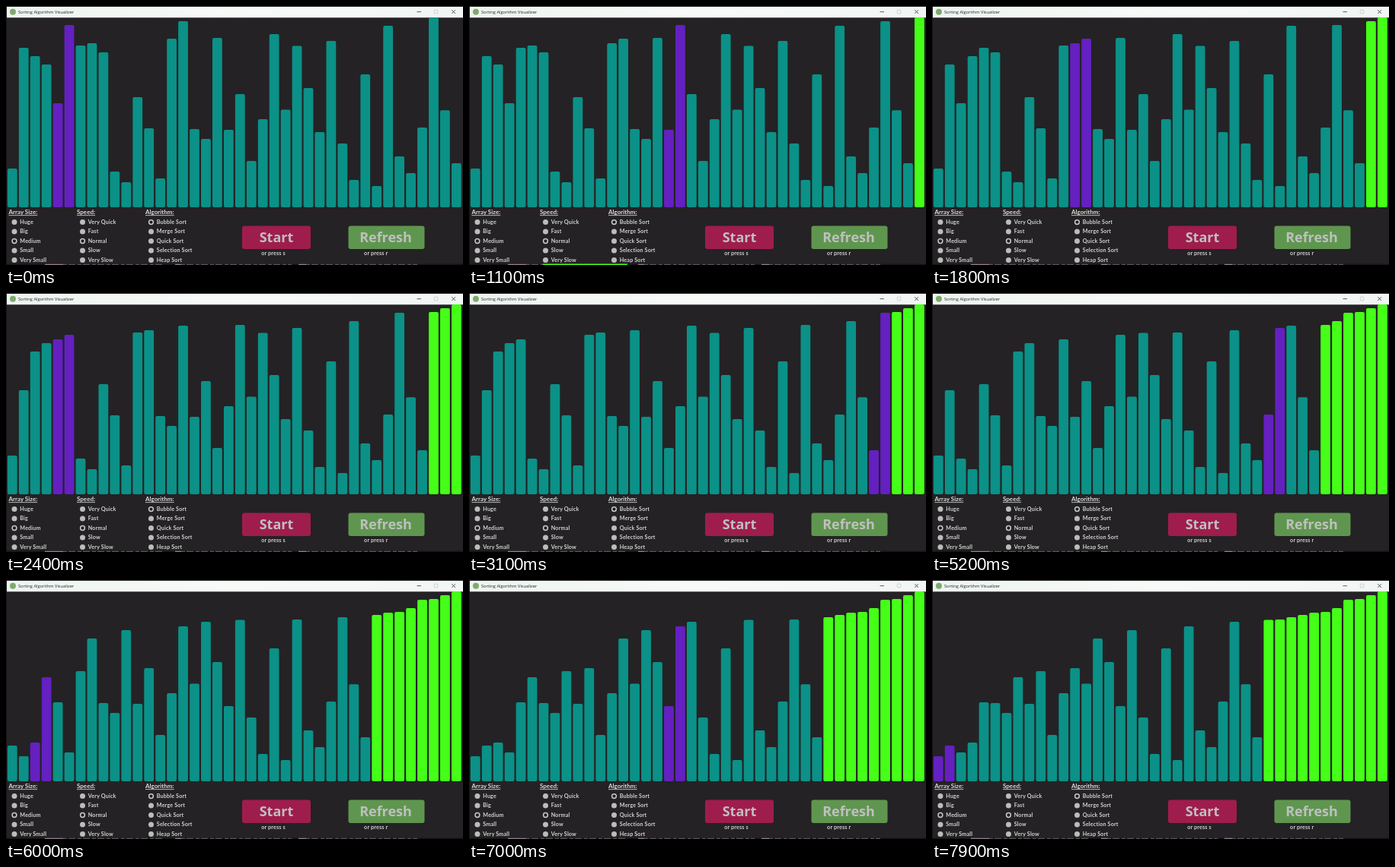
Write an HTML page that moves like this. It is 600 by 341 pixels and loops after 8 s.

```html
<!DOCTYPE html>
<html lang="en">
<head>
<meta charset="utf-8">
<title>Sorting Algorithm Visualizer</title>
<style>
  html, body { margin: 0; width: 100%; height: 100%; overflow: hidden; background: #242224; }
  svg { display: block; width: 600px; height: 341px; }
  .title { font: 5.7px "Open Sans", sans-serif; fill: #222; }
  .head { font: 700 8px Lato, sans-serif; fill: #dedede; text-decoration: underline; }
  .label { font: 700 7.2px Lato, sans-serif; letter-spacing: .15px; fill: #d2d2d2; }
  .mid { text-anchor: middle; }
  .button { font: 900 18px "Noto Sans", "Open Sans", sans-serif; font-stretch: 62.5%; fill: #bfbfbf; text-anchor: middle; }
  .dot { fill: #bcbcbc; }
  .ring { fill: #242224; stroke: #c8c8c8; stroke-width: 1.5; }
  .flash { opacity: 0; animation: flash 8s step-end infinite; }
  @keyframes flash { 13.75% { opacity: 1; } 15% { opacity: 0; } }
</style>
</head>
<body>
<svg viewBox="0 0 600 341">
  <defs>
    <linearGradient id="bar">
      <stop offset="0" stop-color="#edf5f0"/>
      <stop offset=".5" stop-color="#f8faf8"/>
      <stop offset="1" stop-color="#f1f6f5"/>
    </linearGradient>
  </defs>
  <rect width="600" height="341" fill="#161416"/>
  <rect x="1" y="1" width="599" height="338.5" fill="#242224"/>
  <rect x="1" y="1" width="599" height="14.3" fill="url(#bar)"/>
  <circle cx="9" cy="7.7" r="4" fill="#7fa96c"/>
  <text class="title" x="16" y="9.8">Sorting Algorithm Visualizer</text>
  <g fill="none" stroke-width=".8">
    <path d="M539.5 7.7h5.5M585.2 5.2l4.8 4.8m0-4.8l-4.8 4.8" stroke="#333"/>
    <rect x="562.3" y="5.2" width="4.6" height="4.6" rx=".6" stroke="#c4c9c6"/>
  </g>
  <g id="bars"></g>
  <g id="menus"></g>
  <rect x="310" y="289.5" width="90" height="30.5" rx="3" fill="#9f1d4c"/>
  <rect x="449.5" y="289.5" width="100" height="30.5" rx="3" fill="#5f964f"/>
  <text class="button" x="355" y="311">Start</text>
  <text class="button" x="498.5" y="311">Refresh</text>
  <text class="label mid" x="351" y="327.6">or press s</text>
  <text class="label mid" x="485.7" y="327.6">or press r</text>
  <path d="M51 340.3h24M222 340.3h8M384 340.3h10" stroke="#b59ab0" stroke-width="1"/>
  <path d="M75 340.3h133M230 340.3h145M394 340.3h146" stroke="#6c646c" stroke-width="1" stroke-dasharray="5 2 9 3"/>
  <path class="flash" d="M97 340.2h111" stroke="#45ff18" stroke-width="1.4"/>
</svg>
<script>
  const NS = "http://www.w3.org/2000/svg";
  const LOOP = 8000, TICK = 100, BASE = 265;
  const TEAL = "#0b9187", PURPLE = "#6420c0", GREEN = "#45ff18";

  function add(parent, tag, attrs, text = "") {
    const el = document.createElementNS(NS, tag);
    for (const key in attrs) el.setAttribute(key, attrs[key]);
    el.textContent = text;
    return parent.appendChild(el);
  }

  const menus = [
    [3.5, 2, "Array Size:", "Huge", "Big", "Medium", "Small", "Very Small"],
    [93, 2, "Speed:", "Very Quick", "Fast", "Normal", "Slow", "Very Slow"],
    [183, 0, "Algorithm:", "Bubble Sort", "Merge Sort", "Quick Sort", "Selection Sort", "Heap Sort"]
  ];
  const menuRoot = document.getElementById("menus");
  for (const [x, chosen, head, ...items] of menus) {
    add(menuRoot, "text", { class: "head", x, y: 274.3 }, head);
    items.forEach((item, i) => {
      const y = 284.6 + 12.45 * i, on = i === chosen;
      add(menuRoot, "circle", { class: on ? "ring" : "dot", cx: x + 7.5, cy: y, r: on ? 2.9 : 3.5 });
      add(menuRoot, "text", { class: "label", x: x + 14.8, y: y + 2.4 }, item);
    });
  }

  // Top edge of each bar; a smaller value is a taller bar.
  const tops = [
    214, 55, 66, 77, 128, 25, 52, 49, 61, 218, 232, 120, 161, 227, 43, 20, 162, 175, 42, 163,
    116, 204, 149, 37, 136.6, 52.5, 108, 166, 46, 181, 229, 90, 237, 26, 198, 220, 160, 15, 137.3, 207
  ];
  const last = tops.length - 1;

  // Every state of the bubble sort, starting partway through the first pass.
  const states = [{ tops: [...tops], j: 4, pass: 0 }];
  for (let j = 4, pass = 0; states.length < 380;) {
    if (++j >= last - pass) { pass++; j = 0; }
    if (tops[j] < tops[j + 1]) [tops[j], tops[j + 1]] = [tops[j + 1], tops[j]];
    states.push({ tops: [...tops], j, pass });
  }

  // Pace of the sort: [time in ms, comparisons done].
  const pace = [[0, 0], [1100, 52], [2400, 114], [3100, 145], [4400, 206], [6000, 282], [7900, 370]];
  function stepAt(t) {
    const k = pace.findIndex(([time]) => time >= t);
    if (k < 1) return k ? 370 : 0;
    const [t0, s0] = pace[k - 1], [t1, s1] = pace[k];
    return Math.round(s0 + (s1 - s0) * (t - t0) / (t1 - t0));
  }

  const barRoot = document.getElementById("bars");
  const bars = tops.map((_, i) =>
    add(barRoot, "rect", { x: 1.9 + 14.95 * i, width: 12.8, rx: 2 }));

  function draw(now) {
    const t = Math.floor(now % LOOP / TICK) * TICK;
    const { tops, j, pass } = states[stepAt(t)];
    bars.forEach((bar, i) => {
      bar.setAttribute("y", tops[i]);
      bar.setAttribute("height", BASE - tops[i]);
      bar.setAttribute("fill", i === j || i === j + 1 ? PURPLE : i > last - pass ? GREEN : TEAL);
    });
    requestAnimationFrame(draw);
  }
  draw(performance.now());
</script>
</body>
</html>
```
